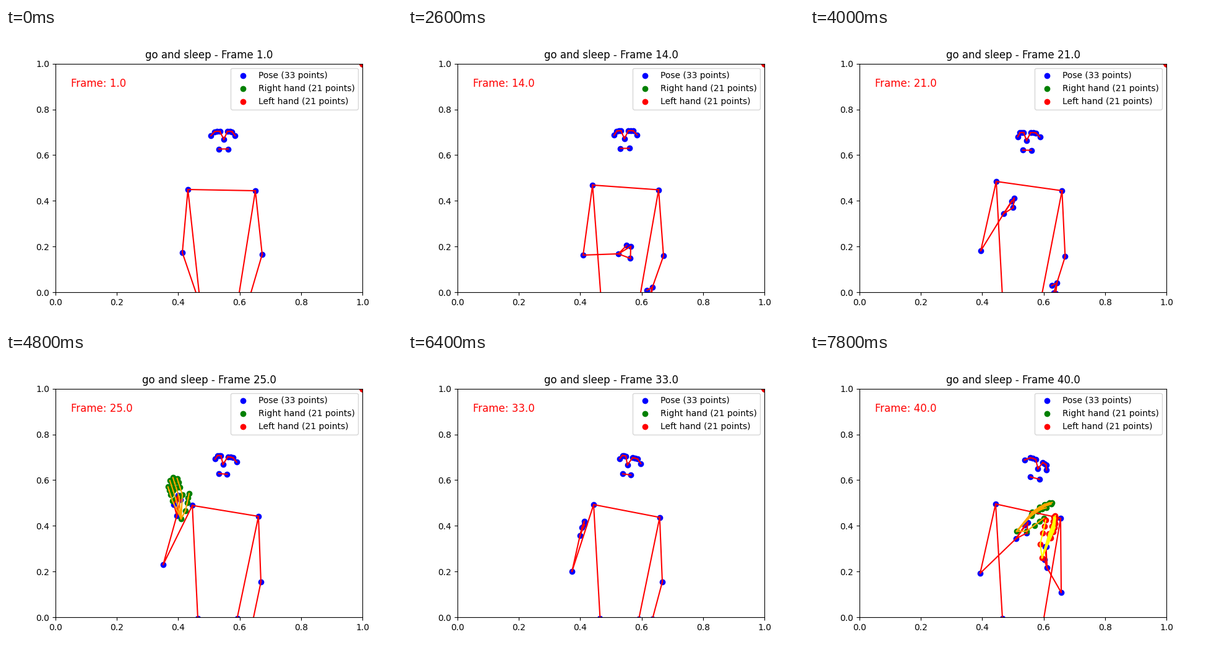
These frames come from a looping animation (640x480 px, 8 s). A matplotlib script:

```python
import numpy as np
import matplotlib.pyplot as plt
from matplotlib.animation import FuncAnimation

COUNT = 40
STEP_MS = 200

# Positions are complex numbers in stage pixels, y pointing down.
BONES = [b.split() for b in (
    "nose l_eye_in", "nose r_eye_in", "l_mouth r_mouth",
    "l_shoulder r_shoulder", "l_hip r_hip")]
for s in "lr":
    BONES += [[f"{s}_{a}", f"{s}_{b}"] for a, b in (
        ("eye_in", "eye"), ("eye", "eye_out"), ("eye_out", "ear"),
        ("shoulder", "elbow"), ("elbow", "wrist"), ("wrist", "pinky"),
        ("wrist", "index"), ("wrist", "thumb"), ("pinky", "index"),
        ("shoulder", "hip"))]

HAND_BONES = [(0 if j == 0 else 4 * f + j, 4 * f + j + 1)
              for f in range(5) for j in range(4)]
NO_HAND = np.full(21, 576 + 57.6j)


def path(*keys):
    """Smooth curve through a few (time, value) keys."""
    k, v = (np.array(c) for c in zip(*keys))
    d = np.diff(v) / np.diff(k)
    m = np.concatenate([d[:1], (v[2:] - v[:-2]) / (k[2:] - k[:-2]), d[-1:]])

    def at(t):
        i = min(np.searchsorted(k, t, side="right") - 1, len(d) - 1)
        h = k[i + 1] - k[i]
        s = (t - k[i]) / h
        return ((1 + 2 * s) * (1 - s) ** 2 * v[i] + s * s * (3 - 2 * s) * v[i + 1]
                + h * s * (1 - s) * ((1 - s) * m[i] - s * m[i + 1]))
    return at


head = path((1, 351.7 + 167j), (14, 350.2 + 166j), (21, 351 + 169j),
            (25, 353 + 167j), (33, 357.5 + 168j), (40, 370.5 + 174.5j))
tilt = path((1, 0), (21, 0.5), (25, 8), (33, 13), (40, 24))
turn = path((1, 0.3), (21, -0.8), (33, -1), (40, 1))

BODY = {
    "l_shoulder": path((1, 403 + 263j), (14, 405 + 261.5j), (25, 408 + 264j),
                       (40, 405 + 267j)),
    "r_shoulder": path((1, 294 + 261j), (7, 295 + 260j), (21, 301 + 248j),
                       (33, 300 + 245j), (40, 300 + 244j)),
    "l_elbow": path((1, 414 + 366j), (25, 412 + 370j), (33, 411 + 370j),
                    (40, 406 + 387j)),
    "r_elbow": path((1, 285 + 363j), (14, 283 + 367j), (21, 276 + 360j),
                    (25, 254 + 342j), (33, 265 + 353j), (40, 275 + 356j)),
    "l_wrist": path((1, 394 + 434j), (14, 395 + 419j), (21, 399 + 412j),
                    (25, 398 + 437j), (33, 395 + 430j), (40, 383 + 347j)),
    "r_wrist": path((1, 308.5 + 432j), (7, 314.5 + 434j), (14, 340 + 365j),
                    (21, 313 + 300j), (25, 276 + 263j), (33, 278 + 295j),
                    (40, 333 + 300j)),
    "l_hip": path((1, 375 + 440j), (21, 373.7 + 436j), (25, 373.5 + 429j),
                  (33, 373 + 430j), (40, 377 + 434j)),
    "r_hip": path((1, 313.4 + 440j), (21, 311 + 434j), (25, 310 + 429j),
                  (40, 311 + 429j)),
}

# Wrist-to-index vectors, and how far each palm faces the viewer.
r_aim = path((1, 8 + 26j), (7, 11 + 21j), (14, 20 - 12j), (21, 17 - 25j),
             (25, 2 - 33j), (33, 7 - 23j), (40, 19 - 26j))
l_aim = path((1, -7 + 20j), (21, -5 + 16j), (33, -7 + 20j), (40, -3 - 34j))
r_open = path((1, 0.7), (14, 0.7), (21, 0.24), (25, -0.17), (33, -0.03), (40, 0.27))
l_open = path((1, 0.35), (33, 0.35), (40, -0.09))


def face(t):
    """Mirrored face: the eye line tilts fully, nose and mouth follow less."""
    c, yaw = head(t), turn(t)
    brow = np.exp(1j * np.radians(tilt(t)))
    jaw = np.exp(0.6j * np.radians(tilt(t)))
    width = 1 + 0.1 * min(yaw, 0)
    p = {"nose": c + 13j * jaw + 1.2 * yaw}
    for s, sign in (("l", width), ("r", -width)):
        p[s + "_eye_in"] = c + 6.2 * sign * brow
        p[s + "_eye_out"] = c + (14 * sign + 0.5j) * brow - 1.4 * yaw
        p[s + "_eye"] = (p[s + "_eye_in"] + p[s + "_eye_out"]) / 2 - 0.3j
        p[s + "_ear"] = c + (19.5 * sign + 7j) * brow - 3.3 * yaw
        p[s + "_mouth"] = c + (7.5 * sign + 28.5j) * jaw
    return p


def pose(t):
    p = face(t) | {name: at(t) for name, at in BODY.items()}
    aim, w = r_aim(t), r_open(t)
    p["r_index"] = p["r_wrist"] + aim
    p["r_thumb"] = p["r_wrist"] + aim * (0.8 + (0.07 - 0.4 * w) * 1j)
    p["r_pinky"] = p["r_wrist"] + aim * (0.55 + w * 1j)
    aim, w = l_aim(t), l_open(t)
    p["l_index"] = p["l_wrist"] + aim
    p["l_thumb"] = p["l_wrist"] + aim * (0.4 + w * 1j)
    p["l_pinky"] = p["l_wrist"] + aim * (1 - 0.5j * w)
    return p


def hand(wrist, thumb, tip, index, pinky, reach, bend=0.0):
    """A wrist and five fingers; four of them fan out from index to pinky."""
    u = np.linspace(0, 1, 4)
    fingers = [(thumb, tip - thumb, 0)]
    for base, size in zip(index + u * (pinky - index),
                          1 + 0.25 * np.sin(np.pi * u) - 0.15 * u):
        fingers.append((base, reach * size, -1j * bend * reach / abs(reach)))
    pts = [0]
    for base, d, side in fingers:
        pts += [base, base + 0.45 * d + side, base + 0.74 * d + side, base + d]
    return wrist + np.array(pts)


RAISED = hand(7 + 5j, 7 - 13j, 13 - 41j, 2 - 39j, -14 - 29j, -8.5 - 26.5j)
FLAT = hand(1 - 12j, 16, 44 - 21j, 25 - 31j, 24 - 25j, 28 - 15j, 1.5)
UPRIGHT = hand(-8 - 16j, -3 - 22j, 6 - 61j, 11 - 39j, 14 - 32j, 8 - 27j, -1.5)


def hands(t, p):
    """Hand shapes turn and scale with the direction of their wrist."""
    right = left = NO_HAND
    if 16 <= t <= 19 or 23 <= t <= 28:
        right = p["r_wrist"] + RAISED * r_aim(t) / r_aim(25)
    elif t >= 38:
        right = p["r_wrist"] + FLAT * r_aim(t) / r_aim(40)
    if t >= 39:
        left = p["l_wrist"] + UPRIGHT * l_aim(t) / l_aim(40)
    return right, left


def to_axes(z):
    z = np.asarray(z)
    return (z.real - 80) / 496, (427.2 - z.imag) / 369.6


fig, ax = plt.subplots(figsize=(6.4, 4.8), dpi=100)
ax.set_xlim(0, 1)
ax.set_ylim(0, 1)
dots = [ax.scatter([], [], color=c, label=label) for c, label in (
    ("blue", "Pose (33 points)"), ("green", "Right hand (21 points)"),
    ("red", "Left hand (21 points)"))]
lines = [ax.plot([], [], color=c)[0] for c in ("red", "orange", "yellow")]
ax.legend(loc="upper right")
title = ax.set_title("")
note = ax.text(0.05, 0.9, "", color="red", fontsize=12)


def show(n, points, bones):
    dots[n].set_offsets(np.column_stack(to_axes(points)))
    route = [z for a, b in bones for z in (a, b, complex(np.nan, np.nan))]
    lines[n].set_data(*to_axes(route))


def update(i):
    t = float(i + 1)
    p = pose(t)
    show(0, list(p.values()), [(p[a], p[b]) for a, b in BONES])
    for n, pts in enumerate(hands(t, p), 1):
        show(n, pts, [(pts[a], pts[b]) for a, b in HAND_BONES])
    title.set_text(f"go and sleep - Frame {t}")
    note.set_text(f"Frame: {t}")
    return [*dots, *lines, title, note]


anim = FuncAnimation(fig, update, frames=COUNT, interval=STEP_MS, repeat=True,
                     repeat_delay=0, blit=False)
plt.show()
```
